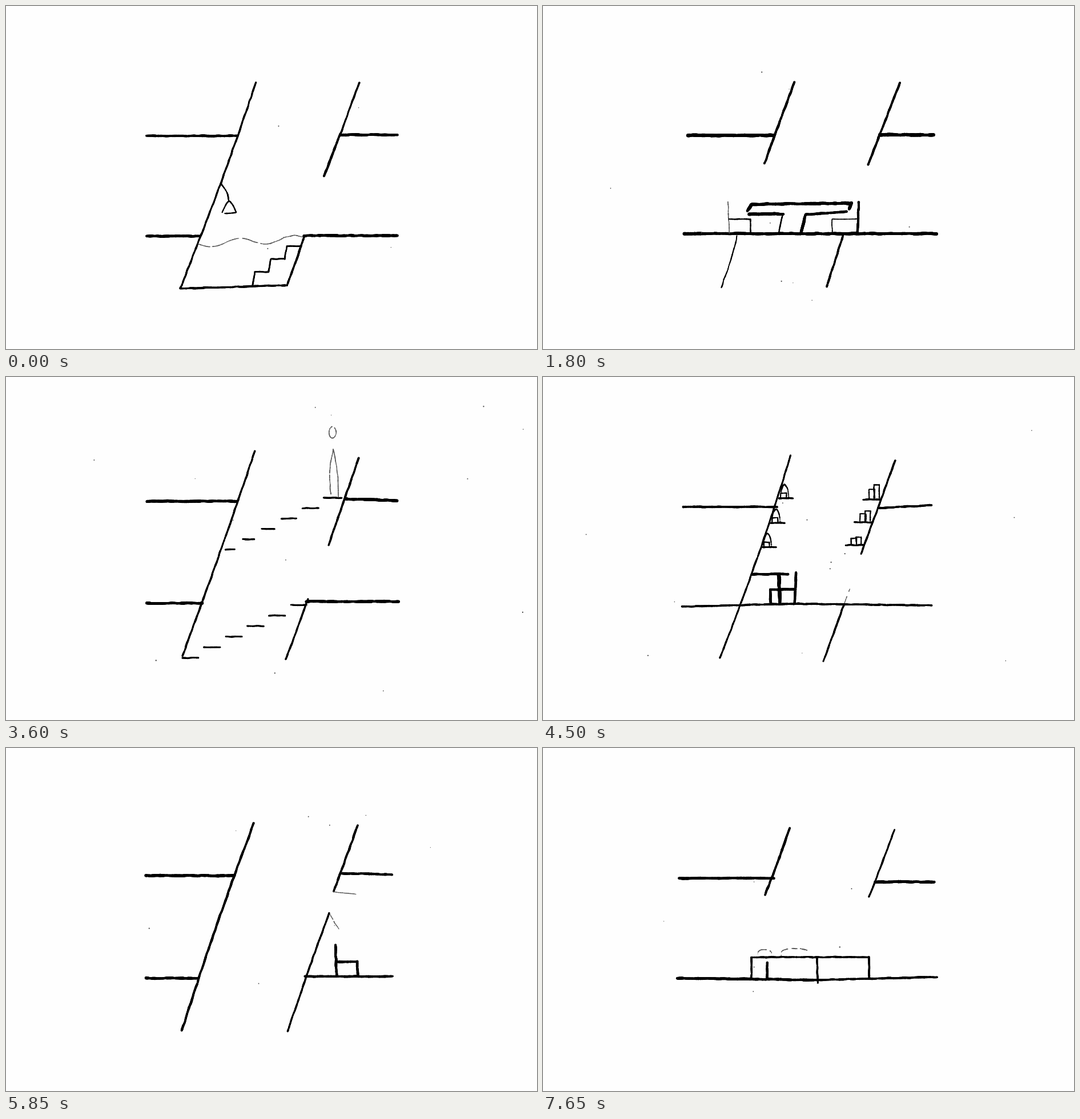
These frames come from a looping animation (930x602 px, 8 s). An HTML page with a canvas:

```html
<!DOCTYPE html>
<html lang="en">
<head>
<meta charset="utf-8">
<title>Section sketches</title>
<style>
  html, body { margin: 0; width: 100%; height: 100%; overflow: hidden; background: #fefefe; }
  canvas { display: block; }
</style>
</head>
<body>
<canvas id="stage" width="930" height="602"></canvas>
<script>
const ctx = document.getElementById('stage').getContext('2d');
const STEP = 450, LOOP = 8000, PAPER = '#fefefe';
let random;

function randomFrom(seed) {
  return () => {
    seed = (seed * 1664525 + 1013904223) >>> 0;
    return seed / 4294967296;
  };
}

// Smooth noise from -1 to 1.
function wobble() {
  const knots = Array.from({ length: 64 }, () => random() * 2 - 1);
  return x => {
    const i = Math.floor(x), f = x - i, s = f * f * (3 - 2 * f);
    return knots[i & 63] * (1 - s) + knots[(i + 1) & 63] * s;
  };
}

function dot(x, y, r) {
  ctx.beginPath();
  ctx.arc(x, y, r, 0, 7);
  ctx.fill();
}

// Inks the path at(t), t from 0 to 1, with an uneven pen.
function trace(weight, length, at) {
  const swayX = wobble(), swayY = wobble(), swell = wobble();
  const faint = weight < 1.3;
  ctx.fillStyle = faint ? '#555' : '#000';
  for (let s = 0; s <= length; s += 0.7) {
    const [x, y] = at(s / length);
    if (faint && swell(s / 6) > 0.75) continue;
    const r = weight / 2 * (1 + swell(s / 7) * 0.15) + 0.2 + (random() - 0.5) * 0.4;
    dot(x + swayX(s / 9) * 0.5, y + swayY(s / 9) * 0.5, Math.max(0.5, r));
  }
}

function line(weight, x0, y0, x1, y1, bow = 0) {
  trace(weight, Math.hypot(x1 - x0, y1 - y0), t =>
    [x0 + (x1 - x0) * t + bow * Math.sin(Math.PI * t), y0 + (y1 - y0) * t]);
}

function chain(weight, ...points) {
  points.slice(1).forEach((p, i) => line(weight, ...points[i], ...p));
}

const slab = (y, x0, x1, weight = 4.3) => line(weight, x0, y, x1, y);
const box = (weight, x, y, w, h) =>
  chain(weight, [x, y], [x, y - h], [x + w, y - h], [x + w, y]);

// A higher flatness gives a blunter top.
function arch(weight, x, y, w, h, flatness = 1) {
  trace(weight, w + h * 1.6, t =>
    [x + w * t, y - h * Math.sin(Math.PI * t) ** (1 / flatness)]);
}

function stairs(weight, x, y, count, run, rise, lean) {
  for (let i = 0; i < count; i++) {
    chain(weight, [x, y], [x + lean, y - rise], [x + lean + run, y - rise]);
    x += lean + run;
    y -= rise;
  }
}

function treads(x, y, run, rise, stretch, width, widen) {
  for (let i = 0; i < 6; i++) {
    slab(y - rise * i, x + run * i + stretch * i * i, x + run * i + stretch * i * i + width + widen * i, 2.6);
  }
}

function chair(x, y, seat, back = 4, front = back) {
  const lean = Math.sign(seat) * 2;
  line(back, x - lean, y - 55, x, y);
  chain(front, [x, y - 25], [x + seat, y - 25], [x + seat + 1, y]);
}

function lamp(x, y) {
  line(2, x, y, x + 14, y + 31, 4);
  arch(1.8, x + 3, y + 50, 24, 19);
  line(1.8, x + 7, y + 52, x + 27, y + 51);
}

function water(x0, x1, y) {
  trace(1.1, x1 - x0, t => {
    const x = x0 + (x1 - x0) * t;
    return [x, y - 10 * t + 6 * Math.cos((x - x0 - 26) * Math.PI * 2 / 95)];
  });
}

function person(x, y) {
  trace(1.2, 44, t => [x - 1 + 6 * Math.cos(t * 6.3), y - 114 + 10 * Math.sin(t * 6.3)]);
  line(1.2, x - 4, y - 5, x, y - 84, -4);
  line(1.2, x + 9, y, x, y - 84, 3);
}

function pool() {
  line(2.7, 438, 134, 305, 496, 3);
  line(2.7, 619, 134, 586, 224);
  line(3.5, 586, 224, 557, 299);
  slab(228, 246, 405, 3.8);
  slab(226, 586, 686);
  slab(404, 246, 340);
  slab(403, 522, 686);
  line(3.2, 305, 496, 492, 490, 0);
  line(3, 522, 404, 492, 490, 1);
  lamp(376, 312);
  stairs(2.2, 432, 489, 3, 24, 22.5, 4);
  water(335, 520, 418);
}

function bench() {
  line(3.5, 440, 134, 388, 276);
  line(3.3, 625, 135, 569, 279);
  slab(227, 254, 404, 5.4);
  slab(226, 590, 684, 5.4);
  slab(399.5, 247, 690, 4.8);
  line(1.6, 340, 403, 312, 494, 2);
  line(3, 526, 401, 497, 493);
  chair(326, 399, 37, 1.2, 2);
  chair(551, 399, -45, 3.6, 1.3);
  chain(4.8, [358, 360], [365, 348], [540, 346], [536, 357]);
  slab(365, 361, 421, 4.8);
  line(2, 420, 366, 413, 398);
  chain(4.2, [452, 397], [460, 366], [532, 361]);
}

function terrace() {
  line(2.5, 453, 130, 413, 226);
  slab(225.5, 252, 413, 3.2);
  line(2.6, 627, 140, 500, 497, 1);
  line(4.2, 599, 229, 694, 225);
  line(2.6, 352, 401, 313, 501);
  line(3, 254, 402, 447, 400);
  stairs(3.8, 447, 401, 1, 53, 29, 6);
  stairs(4.4, 506, 372, 1, 46, 49, 11);
  slab(402, 533, 697, 3.8);
}

function flights() {
  line(2.8, 436, 130, 309, 490, 1.5);
  line(3, 618, 142, 565, 295);
  line(2.7, 529, 390, 490, 496);
  slab(218, 247, 405, 4.5);
  line(4.5, 595, 214, 685, 217);
  slab(397, 247, 344, 4.5);
  slab(394, 526, 687, 4.5);
  treads(384, 303, 30.5, 18.2, 0.8, 17, 3);
  treads(309, 493, 38, 18.6, 0, 28, 0);
  person(573, 211);
}

function shelves() {
  const leftX = y => 434 - (y - 137) * 0.348, rightX = y => 617 - (y - 146) * 0.364;
  line(2.5, 434, 137, 310, 493, 4);
  line(2.8, 617, 146, rightX(311), 311);
  line(2.8, 527, 400, 491, 499, 0);
  line(1, 537, 372, 527, 398);
  slab(228, 246, 410, 3.6);
  line(3.6, 587, 230, 681, 225);
  line(3.2, 243, 403, 440, 398);
  line(3.2, 440, 398, 681, 401);
  for (let i = 0; i < 3; i++) {
    const y = 213 + 43 * i, x = leftX(y) + 6, end = rightX(y + 2), size = 24 - 6 * i;
    slab(y, x, x + 25, 2.8);
    arch(1.7, x + 2, y, 15, 24, 2);
    box(1.7, x + 3, y, 10, 9);
    slab(y + 2 - 3 * i, end - 31, end, 2.8);
    box(1.7, end - 21, y - 3 * i, 10, size / 2 + 4);
    box(1.7, end - 12, y - 3 * i, 9, size);
  }
  slab(346, 365, 429, 4);
  line(5.2, 413, 347, 415, 397);
  chair(441, 398, -43, 4);
}

function hatch() {
  line(3.4, 434, 132, 308, 496, -3);
  slab(224, 245, 398, 4.5);
  slab(404, 245, 337, 4.5);
  line(3.3, 616, 136, 574, 252);
  line(1, 574, 252, 613, 257);
  line(3.8, 587, 220, 677, 222);
  line(2.7, 566, 290, 493, 498, -1);
  line(1, 567, 292, 583, 318);
  slab(401, 523, 677, 3.8);
  chair(579, 400, 36);
}

function bed() {
  line(3.5, 432, 140, 389, 258, 1);
  line(2.6, 616, 143, 571, 262);
  slab(228.5, 238, 405, 4.2);
  slab(235, 582, 685, 4.5);
  line(4.2, 235, 404, 480, 407);
  line(3.4, 480, 407, 690, 402);
  box(2.9, 365, 404, 206, 37);
  line(2.8, 480, 367, 481, 412);
  line(3.8, 393, 376, 392, 403);
  arch(1.1, 376, 361, 24, 7, 3);
  arch(1.1, 417, 364, 50, 12, 5);
}

// A bare section: two slanting walls cut by two floors, with chosen openings.
function room(leftEnd, rightEnd, furnish = () => {}) {
  [[436, leftEnd], [619, rightEnd]].forEach(([x, end]) => {
    const wall = (y0, y1) => line(3, x - (y0 - 134) * 0.355, y0, x - (y1 - 134) * 0.355, y1);
    wall(134, end);
    if (end < 400) wall(402, 495);
  });
  slab(226, 246, 403);
  slab(226, 587, 686);
  slab(402, 246, 340);
  slab(402, 524, 686);
  if (leftEnd < 400) slab(402, 340, 524, 3.6);
  furnish();
}

const scenes = [
  pool,
  () => room(495, 299, () => lamp(376, 312)),
  () => room(495, 299, () => stairs(2.2, 432, 489, 3, 24, 22.5, 4)),
  () => room(495, 280),
  bench,
  () => room(276, 279),
  terrace,
  () => room(495, 299, () => treads(309, 493, 38, 18.6, 0, 28, 0)),
  flights,
  () => room(495, 295, () => treads(309, 493, 38, 18.6, 0, 28, 0)),
  shelves,
  () => room(495, 305),
  () => room(495, 255, () => chair(579, 400, 36)),
  hatch,
  () => room(495, 255, () => chair(579, 400, 36)),
  () => room(495, 495),
  () => room(260, 262),
  bed
];

// Dust on the paper spreads out towards the middle of the loop.
function dust(index) {
  const amount = Math.sin(index * 0.2) ** 2;
  const reach = 0.55 + 0.42 * amount;
  ctx.fillStyle = '#444';
  for (let i = 0; i < 5 + 8 * amount; i++) {
    dot(465 + (random() - 0.5) * 930 * reach, 310 + (random() - 0.5) * 580 * reach, 0.6 + random() * 0.6);
  }
}

function drawScene(index) {
  random = randomFrom(index * 977 + 31);
  ctx.fillStyle = PAPER;
  ctx.fillRect(0, 0, 930, 602);
  scenes[index]();
  dust(index);
}

const start = performance.now();
let shown = -1;
function tick() {
  const index = Math.floor(((performance.now() - start) % LOOP) / STEP);
  if (index !== shown) drawScene(shown = index);
  requestAnimationFrame(tick);
}
tick();
</script>
</body>
</html>
```
